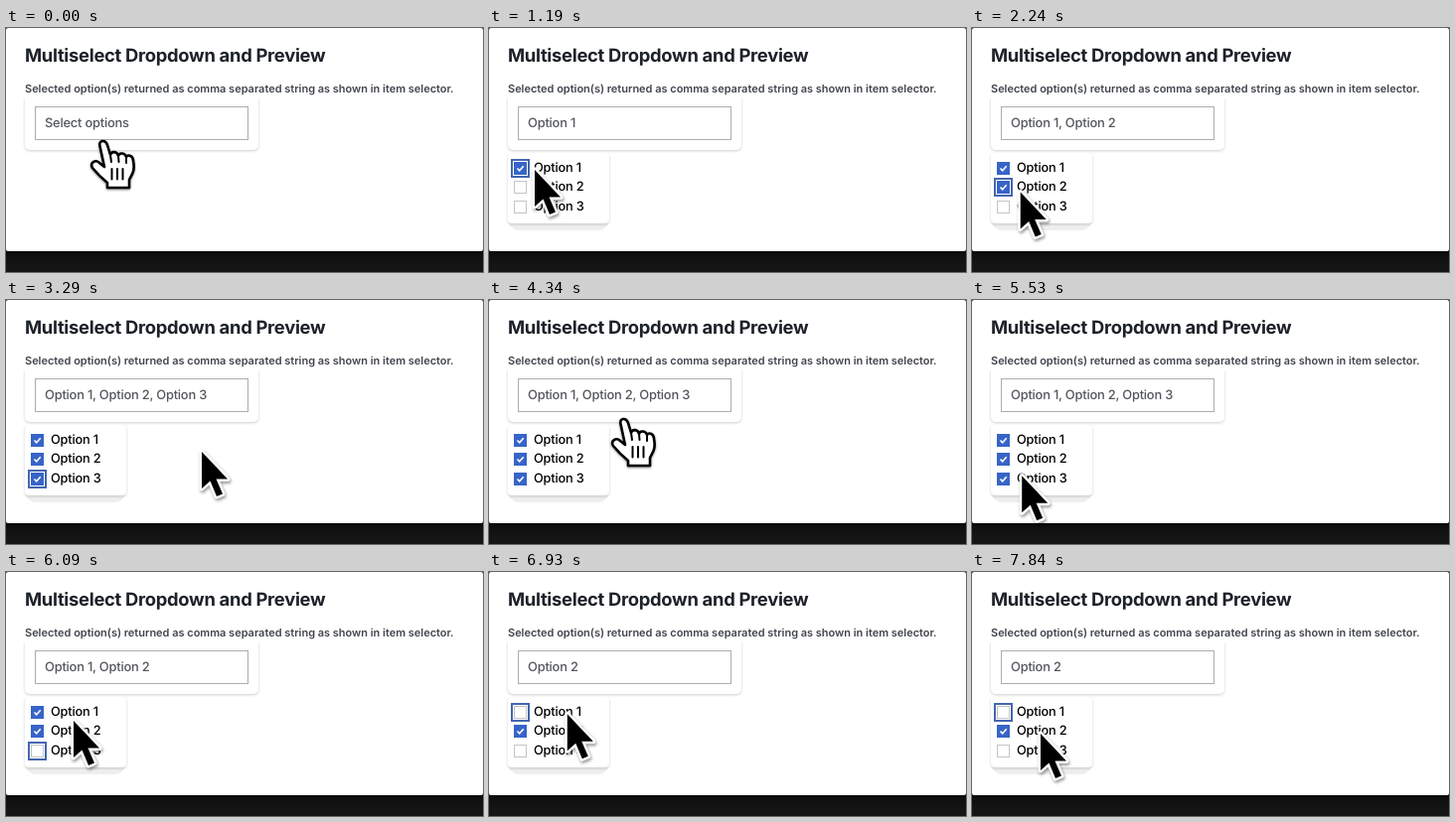
These frames come from a looping animation (480 by 246 pixels, 8000 ms). An HTML page:

```html
<!DOCTYPE html>
<html lang="en">
<head>
<meta charset="utf-8">
<title>Multiselect Dropdown and Preview</title>
<style>
html, body { margin: 0; width: 100%; height: 100%; overflow: hidden; background: #141414; }
#stage { position: relative; width: 480px; height: 246px; overflow: hidden; text-rendering: geometricPrecision;
  background: linear-gradient(#0d0d0d 225px, #151515 240px); font-family: Inter, "Liberation Sans", sans-serif; }
#stage div { position: absolute; box-sizing: border-box; white-space: pre; }
#page { left: 0; top: 0; width: 480px; height: 225px; background: #fff; border-radius: 2px; }
#title { left: 19px; top: 16px; font: 650 18.4px/24px Inter, sans-serif; color: #1d2129; letter-spacing: -.3px; }
#note { left: 19px; top: 54px; font: 600 11px/15px Inter, sans-serif; color: #41464d; letter-spacing: -.02px; }
#card { left: 19px; top: 66px; width: 235px; height: 57px; border-radius: 5px;
  box-shadow: 0 1px 3px rgba(0,0,0,.2); clip-path: inset(5px -6px -6px -6px); }
#field { left: 29px; top: 79px; width: 215px; height: 34px; border: 1px solid #acadb0; }
#value { left: 39px; top: 87px; font-size: 12.9px; font-weight: 450; line-height: 19px; color: #53565b;
  letter-spacing: -.22px; }
#menu { left: 19px; top: 126px; width: 102px; height: 79px; }
#under { left: 0; top: 40px; width: 102px; height: 38px; background: #eee; border-radius: 0 0 12px 12px; }
#list { left: 0; top: 0; width: 102px; height: 71px; background: #fff; border-radius: 4px;
  box-shadow: 0 1px 3px rgba(0,0,0,.18); clip-path: inset(0 -4px -4px -4px); }
.label { left: 26px; font-size: 12.8px; font-weight: 450; line-height: 18px; letter-spacing: -.21px; color: #000; }
.box { left: 6px; width: 13px; height: 13px; border: 1px solid #c3c4c7; background: #fff; }
.box svg { position: absolute; left: -1px; top: -1px; display: none; }
.on { background: #3764c8; border-color: #3764c8; }
.on svg { display: block; }
.focus { outline: 2px solid #4466b0; outline-offset: 1px; }
#pointer { position: absolute; left: 0; top: 0; overflow: visible; }
</style>
</head>
<body>
<div id="stage">
  <div id="page"></div>
  <div id="title">Multiselect Dropdown and Preview</div>
  <div id="note">Selected option(s) returned as comma separated string as shown in item selector.</div>
  <div id="card"></div>
  <div id="field"></div>
  <div id="value"></div>
  <div id="menu"><div id="under"></div><div id="list"></div></div>
  <svg id="pointer" width="1" height="1">
    <g id="arrow" stroke-linejoin="round" style="filter:drop-shadow(1px 2px 1.5px rgba(0,0,0,.4))">
      <path d="M1 3V40L9.500 32.500L16 48L22 45.500L15.500 30.500H27Z" fill="#000" stroke="#fff" stroke-width="5" paint-order="stroke"/>
    </g>
    <g id="hand" fill="none" stroke="#000" stroke-linecap="round" stroke-linejoin="round"
       style="filter:drop-shadow(0 1px 1px rgba(0,0,0,.45))">
      <path fill="#fff" stroke-width="2.6" d="M-3.500 5C-5 -1 2 -2 4 4L7 14C8 10 14 10 15 15C16 11 22 12 23 16C25 13 30 15 30 20
        C32 30 29 33 26 39V47H4V42C-2 37 -7 32 -11 27C-14 22 -8 18 -4 22L1 26Z"/>
      <path stroke-width="2" d="M7 14L8 21M15 15L15.500 21M23 16V22M8.500 28V38.500M14 28V38.500M19.500 28V38.500"/>
    </g>
  </svg>
</div>
<script>
const LOOP = 8000, STEP = 70;
const $ = id => document.getElementById(id);

// Each move eases the tip from wherever it rests to a new spot.
const home = { x: 98, y: 114 };
const moves = [
  { from: 560, to: 1050, x: 45, y: 140 },
  { from: 1400, to: 1890, x: 46, y: 160 },
  { from: 2170, to: 2450, x: 57, y: 176 },
  { from: 3080, to: 3290, x: 196, y: 150 },
  { from: 3710, to: 3990, x: 136, y: 120 },
  { from: 4550, to: 5040, x: 53, y: 163 },
  { from: 5110, to: 5600, x: 49, y: 175 },
  { from: 5810, to: 6090, x: 67, y: 147 },
  { from: 6160, to: 6510, x: 72, y: 139 },
  { from: 6860, to: 7140, x: 109, y: 147 },
  { from: 7420, to: 7840, x: 68, y: 160 }
];
const toggles = [280, 3500, 4340];
const clicks = [
  { at: 1190, option: 1 }, { at: 1820, option: 2 }, { at: 2800, option: 3 },
  { at: 5740, option: 3 }, { at: 6230, option: 1 }
];

const options = [1, 2, 3];
const rows = options.map(n => {
  const y = 16 + (n - 1) * 19.3;
  $("list").insertAdjacentHTML("beforeend",
    `<div class="box" style="top:${Math.round(y) - 7}px"><svg width="13" height="13">` +
    `<path d="M3.500 6.500L5.700 8.800L9.700 4.300" fill="none" stroke="#fff" stroke-width="1.6"/></svg></div>` +
    `<div class="label" style="top:${y - 9}px">Option ${n}</div>`);
  return $("list").querySelectorAll(".box")[n - 1];
});

const ease = k => k * k * (3 - 2 * k);

function tipAt(t) {
  let { x, y } = home;
  for (const m of moves.filter(m => m.from <= t)) {
    const k = ease(Math.min(1, (t - m.from) / (m.to - m.from)));
    x += (m.x - x) * k;
    y += (m.y - y) * k;
  }
  return [x, y];
}

function draw(now) {
  const t = Math.floor((now % LOOP) / STEP + 1e-6) * STEP;
  const toggled = toggles.filter(at => at <= t);
  const done = clicks.filter(c => c.at <= t);
  const checked = options.filter(n => done.filter(c => c.option === n).length % 2);

  // Opening or closing the list drops the focus ring.
  const last = done[done.length - 1];
  const focus = last && last.at > toggled[toggled.length - 1] ? last.option : 0;

  const text = checked.map(n => "Option " + n).join(", ") || "Select options";
  if ($("value").textContent !== text) $("value").textContent = text;
  $("menu").style.display = toggled.length % 2 ? "block" : "none";
  rows.forEach((row, i) => {
    row.classList.toggle("on", checked.includes(i + 1));
    row.classList.toggle("focus", focus === i + 1);
  });

  // The pointer is a hand near the field and an arrow elsewhere.
  const [x, y] = tipAt(t);
  const shape = y < 135 ? "hand" : "arrow";
  for (const id of ["arrow", "hand"]) {
    $(id).setAttribute("transform", `translate(${x} ${y})`);
    $(id).style.display = id === shape ? "inline" : "none";
  }
}

const start = performance.now();
function tick() {
  draw(performance.now() - start);
  requestAnimationFrame(tick);
}
tick();
</script>
</body>
</html>
```
